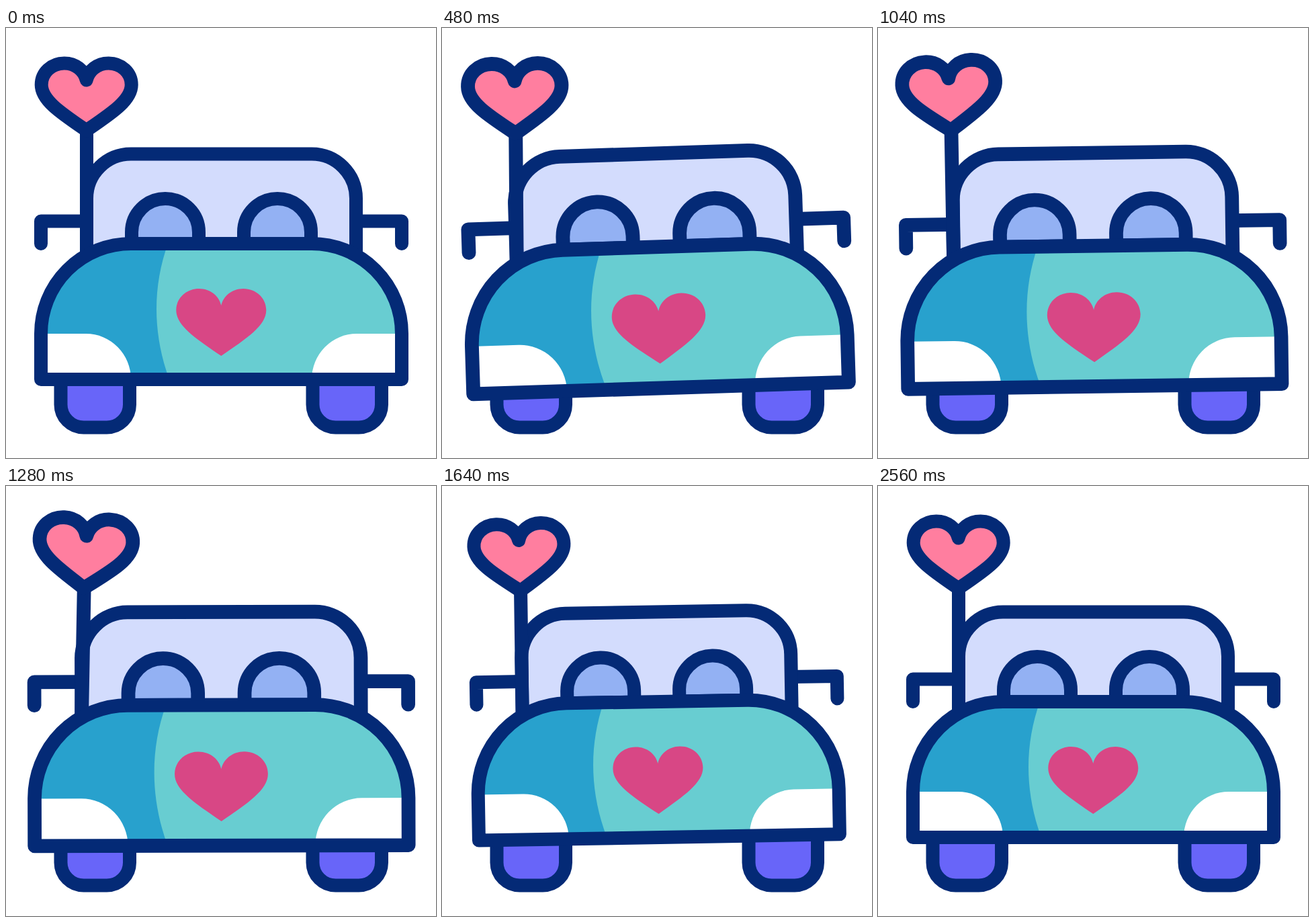
Animation, 640 px wide and 640 px high, one loop 2.88 s. Source, as an HTML page:

```html
<!DOCTYPE html>
<html lang="en">
<head>
<meta charset="utf-8">
<title>Wedding car</title>
<style>
  html, body { margin: 0; width: 100%; height: 100%; overflow: hidden; background: #fff; }
  svg { display: block; width: 100vw; height: 100vh; }
  .line { stroke: #042a76; stroke-width: 20; stroke-linejoin: round; stroke-linecap: round; }
</style>
</head>
<body>
<svg viewBox="0 0 640 640">
  <defs>
    <path id="heart" d="M0 0C-38 -26 -67 -45 -67 -68C-67 -86 -52 -100 -33 -100C-16 -100 -3 -89 0 -75C3 -89 16 -100 33 -100C52 -100 67 -86 67 -68C67 -45 38 -26 0 0Z"/>
    <path id="wheel" d="M0 500V560.5A34 34 0 0 0 34 594.5H68.5A34 34 0 0 0 102.5 560.5V500Z"/>
    <path id="seat" d="M-50 321V304A50 50 0 0 1 50 304V321Z"/>
    <path id="hood" d="M52 523V455A134 134 0 0 1 186 321H455A134 134 0 0 1 589 455V523Z"/>
  </defs>

  <g class="line" fill="#6865f9">
    <use href="#wheel" x="81.5"/>
    <use href="#wheel" x="456.5"/>
  </g>

  <g id="car">
    <path class="line" fill="none" d="M120 287.5H52V321M521 287.5H589V321"/>
    <path class="line" fill="#d3dcfd" stroke-linecap="butt" d="M120 340V253.5A66 66 0 0 1 186 187.5H455A66 66 0 0 1 521 253.5V340"/>
    <g class="line" fill="#93b1f3">
      <use href="#seat" x="237"/>
      <use href="#seat" x="404"/>
    </g>
    <g id="flag" class="line">
      <path d="M120 152V335"/>
      <use id="balloon" href="#heart" x="119.7" y="152.5" fill="#ff7e9f"/>
    </g>
    <use href="#hood" fill="#68cdd1"/>
    <path fill="#28a1cd" d="M52 523V455A134 134 0 0 1 186 321H241C218 385 218 455 243 523Z"/>
    <path fill="#fff" d="M52 455H119A67 68 0 0 1 186 523H52ZM589 455H522A67 68 0 0 0 455 523H589Z"/>
    <use href="#heart" x="320.3" y="488" fill="#d84785"/>
    <use href="#hood" class="line" fill="none"/>
  </g>
</svg>
<script>
  const LOOP = 2880, STEP = 40;
  const BOUNCE = 800;      // one hop; the car makes two
  const ROCK = 1840;       // three side-to-side rocks, slightly speeding up
  const FLAG_REST = 2560;  // the flag swings on after the car has stopped

  const { sin, PI, floor, max, min } = Math;
  const [car, flag, balloon] = ["car", "flag", "balloon"].map(id => document.getElementById(id));

  // Rocking wave, started at zero.
  function rock(t) {
    const u = max(0, t) / ROCK;
    return sin(2 * PI * 3 * u * (0.84 + 0.16 * u));
  }

  function draw(now) {
    const t = floor((now % LOOP) / STEP) * STEP;

    const hop = min(t, 2 * BOUNCE);
    const press = sin(PI * hop / BOUNCE) ** 2;
    const swell = sin(PI * hop / (2 * BOUNCE));
    const zoom = 1 + 0.021 * swell + 0.0265 * press;
    const y = 355 + 6.8 * press;
    const tilt = t < ROCK ? 2.2 * (1 - 0.42 * t / ROCK) * rock(t) : 0;

    // Pole and heart lean against the car's tilt, each a little later.
    const fade = 2.4 * max(0, 1 - (t / FLAG_REST) ** 2);
    const lean = -fade * rock(t - 60);
    const sway = -fade * rock(t - 150);

    car.setAttribute("transform",
      `translate(320.5 ${y}) rotate(${tilt}) scale(${zoom}) translate(-320.5 -355)`);
    flag.setAttribute("transform", `rotate(${lean} 120 335)`);
    balloon.setAttribute("transform", `rotate(${sway} 120 152.5)`);
  }

  const start = performance.now();
  function tick() {
    draw(performance.now() - start);
    requestAnimationFrame(tick);
  }
  tick();
</script>
</body>
</html>
```
